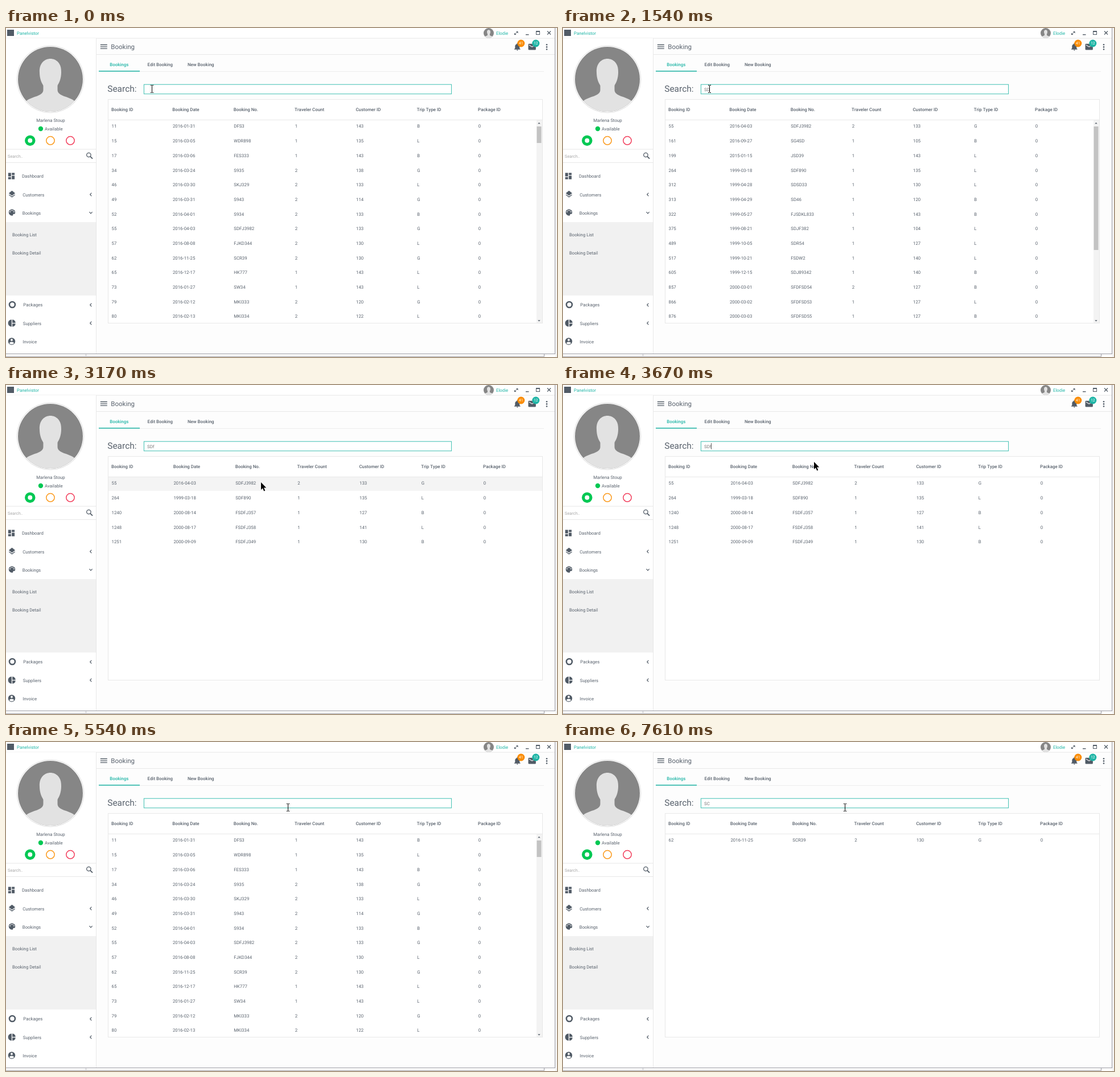
Animation, 968 px wide and 578 px high, one loop 8 s. Source, as an HTML page with a canvas:

```html
<!DOCTYPE html>
<html lang="en">
<head>
<meta charset="utf-8">
<title>Booking list</title>
<style>
html, body { margin: 0; width: 100%; height: 100%; overflow: hidden; background: #fff; }
canvas { display: block; width: 968px; height: 578px; }
</style>
</head>
<body>
<canvas id="stage" width="968" height="578"></canvas>
<script>
const ctx = document.getElementById('stage').getContext('2d');
const LOOP = 8000;
const TEAL = '#1fb5a6', INK = '#59626d', DARK = '#515b66', LINE = '#e8e8e8';

// id, date, number, travelers, customer, trip type
const BOOKINGS = `11 2016-01-31 DFS3 1 143 B
15 2016-03-05 WDR898 1 135 L
17 2016-03-06 FES333 1 143 B
34 2016-03-24 S935 2 138 G
46 2016-03-30 SKJ329 2 133 L
49 2016-03-31 S943 2 114 G
52 2016-04-01 S934 2 133 B
55 2016-04-03 SDFJ3982 2 133 G
57 2016-08-08 FJKD344 2 130 L
62 2016-11-25 SCR39 2 130 G
65 2016-12-17 HK777 1 143 L
73 2016-01-27 SW34 1 143 L
79 2016-02-12 MKI333 2 120 G
80 2016-02-13 MKI334 2 122 L
124 2016-04-29 SJKDK89 2 114 G
152 2016-08-15 WS343 2 130 G
161 2016-09-27 SG4SD 1 105 B
199 2015-01-15 JSD39 1 143 L
226 1999-02-19 DS3DF 1 143 B
264 1999-03-18 SDF890 1 135 L
312 1999-04-28 SDSD33 1 130 L
313 1999-04-29 SD46 1 120 B
322 1999-05-27 FJSDKL833 1 143 B
375 1999-08-21 SDJF382 1 104 L
489 1999-10-05 SDR54 1 127 L
517 1999-10-21 FSDW2 1 140 L
605 1999-12-15 SDJ89342 1 140 B
857 2000-03-01 SFDFSD54 2 127 B
866 2000-03-02 SFDFSD53 1 127 L
876 2000-03-03 SFDFSD55 1 127 B
1240 2000-08-14 FSDFJ357 1 127 B
1248 2000-08-17 FSDFJ358 1 141 L
1251 2000-09-09 FSDFJ349 1 130 B`.split('\n').map(row => [...row.split(' '), '0']);
const HEADERS = ['Booking ID', 'Booking Date', 'Booking No.', 'Traveler Count',
  'Customer ID', 'Trip Type ID', 'Package ID'];
const THUMB = { '': 29, S: 100, SD: 217 };

// Timelines: [start, value...]
const TYPED = [[0, ''], [1110, 'S'], [1540, 'SD'], [1830, 'SDf'], [4590, 'SD'],
  [4740, 'S'], [4890, ''], [6930, 'S'], [7220, 'SC']];
const FILTER = [[0, ''], [1110, 'S'], [1540, 'SD'], [1830, 'SDF'], [4590, ''],
  [6930, 'S'], [7220, 'SC']];
const POINTER = [[0, 'beam', 256, 107], [120, 'beam', 257, 107], [1970, 'beam', 286, 114],
  [2120, 'arrow', 330, 122], [2240, 'arrow', 387, 134], [2390, 'arrow', 430, 152],
  [2510, 'arrow', 445, 160], [2630, 'arrow', 448, 163], [2750, 'arrow', 448, 170],
  [2910, 'arrow', 448, 171], [3670, 'arrow', 441, 135], [3790, 'arrow', 437, 123],
  [3940, 'arrow', 437, 119], [4090, 'beam', 495, 115]];
const BLINKS = [400, 990, 1110, 2120, 2630, 3170, 3670, 4090, 4590, 5540, 5940, 6530, 6930, 7610];
const HOVER = [2750, 3670];

const at = (track, t) => track.findLast(key => key[0] <= t);

function rect(x, y, w, h, color) {
  ctx.fillStyle = color;
  ctx.fillRect(x, y, w, h);
}

function frame(x, y, w, h, color, width = 1) {
  ctx.strokeStyle = color;
  ctx.lineWidth = width;
  ctx.strokeRect(x, y, w, h);
}

function disc(x, y, r, color) {
  ctx.fillStyle = color;
  ctx.beginPath();
  ctx.arc(x, y, r, 0, 7);
  ctx.fill();
}

function ring(x, y, r, width, color) {
  ctx.strokeStyle = color;
  ctx.lineWidth = width;
  ctx.beginPath();
  ctx.arc(x, y, r, 0, 7);
  ctx.stroke();
}

function line(points, color, width = 1) {
  ctx.strokeStyle = color;
  ctx.lineWidth = width;
  ctx.beginPath();
  points.forEach(p => ctx.lineTo(...p));
  ctx.stroke();
}

function shape(points, color) {
  ctx.fillStyle = color;
  ctx.beginPath();
  points.forEach(p => ctx.lineTo(...p));
  ctx.fill();
}

function text(str, x, y, { size = 7.8, weight = 400, color = INK, align = 'left' } = {}) {
  ctx.font = `${weight} ${size}px Roboto, sans-serif`;
  ctx.textAlign = align;
  ctx.fillStyle = color;
  ctx.fillText(str, x, y + size * 0.355);
  return ctx.measureText(str).width;
}

// Fills a path drawn in a 24-unit box centred on x, y
function icon(d, x, y, size, color = DARK) {
  ctx.save();
  ctx.translate(x - size / 2, y - size / 2);
  ctx.scale(size / 24, size / 24);
  ctx.fillStyle = color;
  ctx.fill(new Path2D(d));
  ctx.restore();
}

const TILES = 'M3 13h8V3H3zM3 21h8v-6H3zM13 21h8V11h-8zM13 3v6h8V3z';
const LAYERS = 'M12 18.5L4.6 12.8 3 14l9 7 9-7-1.6-1.2zM12 16l9-7-9-7-9 7z';
const PIE = 'M11 2v20a10 10 0 0 1 0-20zM13 2v9h9a10 10 0 0 0-9-9zM13 13v9a10 10 0 0 0 9-9z';
const MENU = 'M3 18h18v-2H3zM3 13h18v-2H3zM3 8h18V6H3z';
const BELL = 'M10 20a2 2 0 0 0 4 0zM18 16v-5c0-3-1.6-5.6-4.5-6.3V4a1.5 1.5 0 0 0-3 0v.7C7.6 5.4 6 8 6 11v5l-2 2v1h16v-1z';
const MAIL = 'M20 4H4a2 2 0 0 0-2 2v12a2 2 0 0 0 2 2h16a2 2 0 0 0 2-2V6a2 2 0 0 0-2-2zm0 4l-8 5-8-5V6l8 5 8-5z';

function portrait(x, y, r) {
  ctx.save();
  ctx.beginPath();
  ctx.arc(x, y, r, 0, 7);
  ctx.clip();
  rect(x - r, y - r, 2 * r, 2 * r, '#868686');
  ctx.translate(x, y);
  ctx.scale(r / 57, r / 57);
  ctx.fillStyle = '#e2e2e2';
  ctx.beginPath();
  ctx.moveTo(-50, 60);
  ctx.lineTo(-42, 38);
  ctx.bezierCurveTo(-32, 30, -13, 30, -12.5, 19);
  ctx.lineTo(-12.5, 8);
  ctx.lineTo(12.5, 8);
  ctx.lineTo(12.5, 19);
  ctx.bezierCurveTo(13, 30, 32, 30, 42, 38);
  ctx.lineTo(50, 60);
  ctx.fill();
  ctx.beginPath();
  ctx.moveTo(-19, -12);
  ctx.bezierCurveTo(-21, -44, 21, -44, 19, -12);
  ctx.bezierCurveTo(19, 6, 9, 19, 0, 19);
  ctx.bezierCurveTo(-9, 19, -19, 6, -19, -12);
  ctx.fill();
  ctx.restore();
}

function chevron(x, y, open) {
  const points = open ? [[-2.6, -1.3], [0, 1.3], [2.6, -1.3]] : [[1.3, -2.8], [-1.3, 0], [1.3, 2.8]];
  line(points.map(([px, py]) => [x + px, y + py]), DARK, 1.2);
}

function titleBar() {
  rect(2, 3, 12, 11, DARK);
  text('Panelvistor', 19, 9, { color: TEAL });
  portrait(848, 9, 9);
  text('Elodie', 861, 9, { color: TEAL });
  line([[894, 11], [898.5, 6.5]], DARK);
  shape([[896, 6], [899.5, 6], [899.5, 9.5]], DARK);
  shape([[893, 8.5], [893, 12], [896.5, 12]], DARK);
  rect(913, 11, 5.5, 1.4, DARK);
  frame(931.5, 5.5, 6, 6, DARK);
  rect(931, 5, 7, 2, DARK);
  line([[951, 5.5], [957, 11.5]], DARK, 1.3);
  line([[957, 5.5], [951, 11.5]], DARK, 1.3);
  rect(0, 17.5, 964, 1, LINE);
}

function sideBar() {
  rect(0, 18, 158, 554, '#fff');
  ring(78, 90, 58.8, 0.8, '#d4d4d4');
  portrait(78, 90, 57);
  text('Marlena Stoup', 78.5, 162, { align: 'center' });
  disc(61, 177, 4.2, '#00c853');
  text('Available', 68, 177);
  ring(42.3, 197.8, 6.6, 5.3, '#00c853');
  ring(78, 197.8, 7.2, 1.5, '#fb9a1d');
  ring(113, 197.8, 7.2, 1.5, '#f2405d');

  rect(0, 212.5, 158, 1, LINE);
  text('Search..', 3, 225.5, { color: '#a9a9a9', size: 7.4 });
  ring(145.4, 223, 3.7, 1.3, DARK);
  line([[148, 225.6], [152, 229.6]], DARK, 1.8);
  rect(0, 236, 158, 1, LINE);

  rect(0, 341, 158, 129, '#f1f1f1');
  text('Booking List', 11, 363.6);
  text('Booking Detail', 11, 395.6);

  icon(TILES, 9.5, 260, 15);
  text('Dashboard', 28, 260.5);
  icon(LAYERS, 10.5, 292, 15);
  text('Customers', 29.2, 292.8);
  disc(10.5, 324, 5.7, DARK);
  [[7, 323], [9, 320.5], [12, 320.5], [14, 323]].forEach(([x, y]) => disc(x, y, 0.9, '#fff'));
  disc(14.2, 328.4, 2, '#fff');
  text('Bookings', 28.8, 324.8);
  ring(11, 486, 5, 2.6, DARK);
  text('Packages', 30.3, 486.7);
  icon(PIE, 10.5, 518.5, 15);
  text('Suppliers', 29.8, 518.8);
  disc(10, 550.5, 6.2, DARK);
  disc(10, 548, 1.9, '#fff');
  ctx.beginPath();
  ctx.ellipse(10, 553.4, 3.7, 2, 0, 0, 7);
  ctx.fill();
  text('Invoice', 29.3, 551);

  [292.5, 486.5, 518.5].forEach(y => chevron(149, y, false));
  chevron(149, 324.5, true);
  rect(158, 18, 1, 554, LINE);
}

function badge(x, label, color) {
  disc(x, 27, 6.5, color);
  text(label, x, 27, { size: 6.8, color: '#fff', align: 'center' });
}

function pageHeader() {
  icon(MENU, 171.8, 32.8, 16);
  text('Booking', 184.3, 32.8, { size: 11.5 });
  icon(BELL, 898.3, 33, 16);
  badge(904.8, '41', '#fb8c00');
  icon(MAIL, 924.2, 33.2, 16);
  badge(930.8, '12', TEAL);
  [29.3, 33.4, 37.5].forEach(y => disc(950, y, 1.3, DARK));
  rect(159, 46, 805, 1, LINE);

  const tab = { size: 7.9, weight: 500, align: 'center' };
  text('Bookings', 198.7, 64, { ...tab, color: TEAL });
  text('Edit Booking', 270.7, 64, tab);
  text('New Booking', 342.2, 64, tab);
  rect(163, 76, 782, 1, '#ededed');
  rect(163, 75, 72, 1.5, TEAL);
}

function searchField(t) {
  text('Search:', 178.3, 107, { size: 15.4 });
  rect(242, 99, 541, 17, '#fff');
  frame(242.4, 99.2, 540.2, 16.6, '#3fbfb2');
  const width = text(at(TYPED, t)[1], 248, 107.8, { color: '#777' });
  const flips = BLINKS.filter(b => b <= t).length;
  if (flips % 2) rect(Math.round(247.5 + width), 102, 1, 11, '#666');
}

function scrollBar(length) {
  rect(932, 162, 10, 357, '#f3f3f3');
  rect(932.5, 173, 8, length, '#c3c3c3');
  shape([[934.3, 168.2], [936.5, 166], [938.7, 168.2]], DARK);
  shape([[934.3, 513.3], [936.5, 515.5], [938.7, 513.3]], DARK);
}

function table(t) {
  const query = at(FILTER, t)[1];
  const rows = BOOKINGS.filter(row => row[2].includes(query)).slice(0, 14);
  const scrolls = query in THUMB;
  const pitch = scrolls ? 107.35 : 108.85;
  rect(179, 125, 764, 394, '#fff');
  if (t >= HOVER[0] && t < HOVER[1]) rect(180, 162, 762, 24, '#f4f4f4');
  HEADERS.forEach((h, i) => text(h, 185 + i * pitch, 143.6, { size: 7.9, weight: 500 }));
  rows.forEach((row, r) =>
    row.forEach((cell, c) => text(cell, 185.6 + c * pitch, 172.7 + r * 25.69)));
  rect(180, 161, 762, 1, LINE);
  if (scrolls) scrollBar(THUMB[query]);
  frame(179.5, 125.5, 763, 393, LINE);
}

function pointer(t) {
  const [, kind, x, y] = at(POINTER, t);
  ctx.save();
  ctx.translate(x, y);
  if (kind === 'beam') {
    rect(0, -6, 1, 12, '#000');
    for (const end of [-7, 6]) {
      rect(-2, end, 2, 1, '#000');
      rect(1, end, 2, 1, '#000');
    }
  } else {
    shape([[0, 0], [0, 13], [3, 10.3], [5.2, 15.5], [7.2, 14.6], [5, 9.6], [9.2, 9.4]], '#000');
  }
  ctx.restore();
}

function backdrop() {
  rect(0, 0, 968, 578, '#fff');
  rect(159, 18, 805, 554, '#fdfdfd');
  rect(965, 0, 3, 578, '#f4f4f4');
  rect(0, 576.5, 946, 1, '#9b9ba3');
  rect(140, 573, 1, 4, '#c4c4c8');
  rect(945, 573, 1, 4, '#9b9ba3');
}

function windowEdge() {
  rect(0, 572, 965, 1, '#9b9ba3');
  rect(964, 0, 1, 573, '#9b9ba3');
}

function draw(t) {
  backdrop();
  titleBar();
  sideBar();
  pageHeader();
  searchField(t);
  table(t);
  windowEdge();
  pointer(t);
}

ctx.textRendering = 'geometricPrecision';
ctx.fontKerning = 'none';
const start = performance.now();
function tick() {
  draw((performance.now() - start) % LOOP);
  requestAnimationFrame(tick);
}
tick();
</script>
</body>
</html>
```
